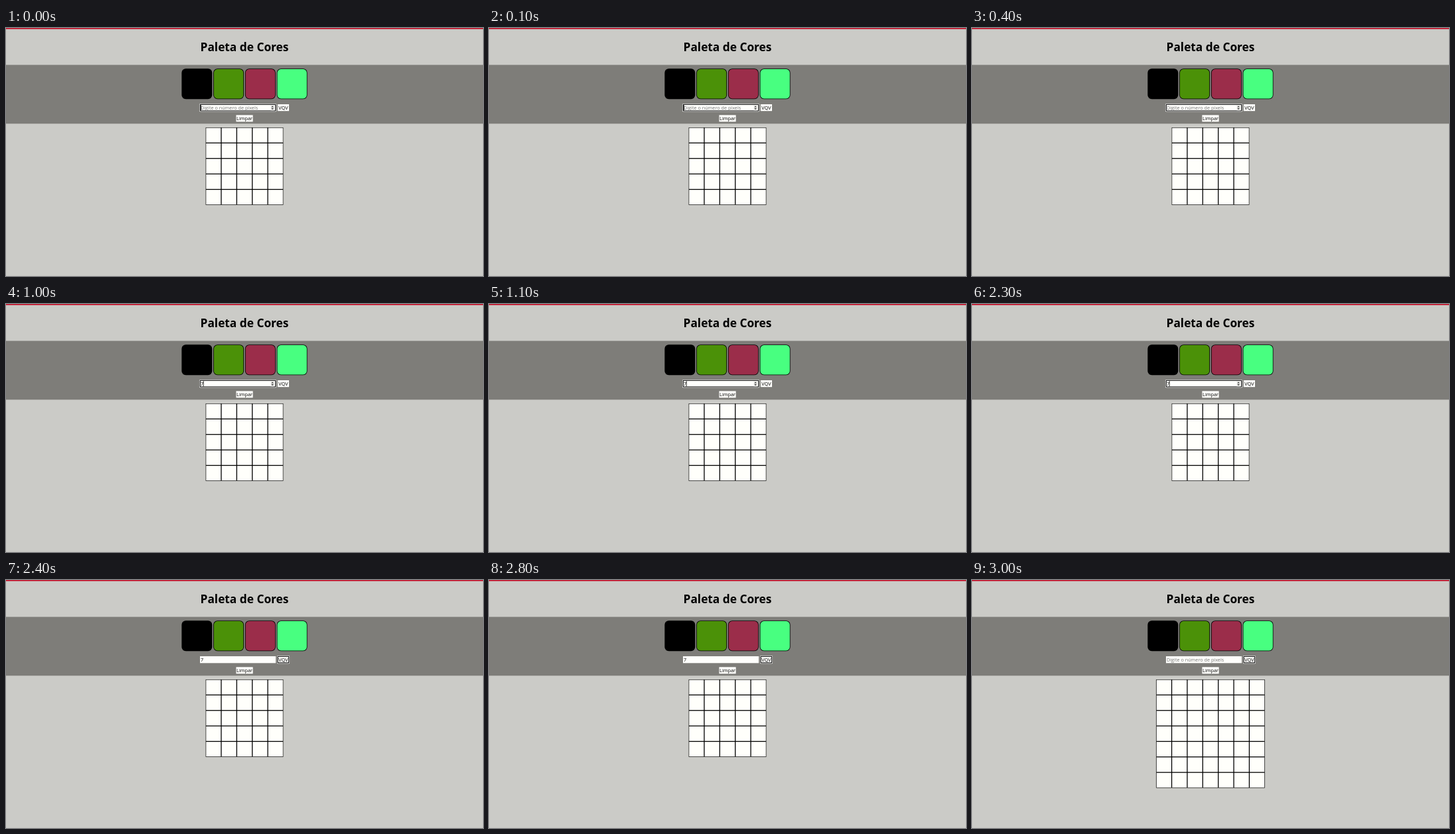
An HTML page with a canvas that plays this animation: 718x374 px, repeating every 5.2 s.

```html
<!DOCTYPE html>
<html lang="pt">
<head>
<meta charset="utf-8">
<title>Paleta de Cores</title>
<style>
html, body { margin: 0; width: 100%; height: 100%; overflow: hidden; background: #cbcbc7; }
canvas { display: block; width: 718px; height: 374px; }
</style>
</head>
<body>
<canvas id="stage" width="718" height="374"></canvas>
<script>
const ctx = document.getElementById('stage').getContext('2d');
const LOOP = 5200;
const TYPED = 1000, BLUR = 2400, SUBMIT = 3000;
const FONT = '"Open Sans", "Noto Sans", sans-serif';
const SMALL = '7.25px ' + FONT;
const SWATCHES = ['#000', '#4b9108', '#9b2d4a', '#48ff80'];

function box(x, y, w, h, color) {
  ctx.fillStyle = color;
  ctx.fillRect(x, y, w, h);
}

function label(str, x, y, color = '#000', align = 'left', font = SMALL) {
  ctx.font = font;
  ctx.textAlign = align;
  ctx.fillStyle = color;
  ctx.fillText(str, x, y);
}

function round(x, y, w, h, r, color) {
  ctx.beginPath();
  ctx.roundRect(x, y, w, h, r);
  ctx.fillStyle = color;
  ctx.fill();
}

// White halo, black ring, then the control itself
function focusRing(x, y, w, h) {
  round(x - 1, y - 1, w + 2, h + 2, 1.5, '#f4f4f2');
  round(x - 0.3, y - 0.3, w + 0.6, h + 0.6, 1, '#101010');
  box(x + 0.9, y + 0.9, w - 1.8, h - 1.8, '#fffffc');
}

function control(x, y, w, h, focused) {
  if (focused) focusRing(x, y, w, h);
  else box(x, y, w, h, '#fffffc');
}

function arrow(x, y, dir) {
  ctx.beginPath();
  ctx.moveTo(x - 1.9, y);
  ctx.lineTo(x + 1.9, y);
  ctx.lineTo(x, y + 2.1 * dir);
  ctx.fillStyle = '#333';
  ctx.fill();
}

function swatch(color, i) {
  const x = 264.4 + i * 47.75;
  round(x, 61.3, 45.9, 45.9, 6.2, '#000');
  round(x + 0.8, 62.1, 44.3, 44.3, 5.4, color);
}

function grid(n) {
  const size = 23.36, edge = 0.65;
  const left = 359 - n * size / 2, top = 150;
  box(left, top, n * size, n * size, '#000');
  for (let r = 0; r < n; r++)
    for (let c = 0; c < n; c++)
      box(left + c * size + edge, top + r * size + edge, size - 2 * edge, size - 2 * edge, '#fffffb');
}

function caretOn(t) {
  if (t < TYPED) return t < 400;
  return t < 1700 || t >= 2300;
}

function numberInput(t) {
  const focused = t < BLUR;
  const filled = t >= TYPED && t < SUBMIT;
  control(292, 115, 114, 10.3, focused);
  if (filled) label('7', 293.1, 122.7);
  else label('Digite o número de pixels', 293, 122.7, '#757575');
  if (!focused) return;
  box(398.4, 116, 5.4, 8.3, '#efefec');
  arrow(401.1, 119.5, -1);
  arrow(401.1, 120.9, 1);
  if (caretOn(t)) box(filled ? 296.8 : 293, 116.2, 0.8, 8, '#000');
}

function draw(t) {
  box(0, 0, 718, 374, '#cbcbc7');
  box(0, 0, 718, 1.6, '#c30a24');
  label('Paleta de Cores', 359, 35, '#000', 'center', 'bold 17.3px ' + FONT);
  box(0, 55.6, 718, 88.7, '#7e7d79');
  SWATCHES.forEach(swatch);
  numberInput(t);
  control(408.8, 115, 17.2, 10.2, t >= BLUR);
  label('VQV', 417.4, 122.7, '#000', 'center');
  control(346.4, 131.3, 25.2, 10, false);
  label('Limpar', 359, 138.8, '#000', 'center');
  grid(t < SUBMIT ? 5 : 7);
}

const start = performance.now();
function tick(now) {
  draw(Math.max(0, now - start) % LOOP);
  requestAnimationFrame(tick);
}
draw(0);
requestAnimationFrame(tick);
</script>
</body>
</html>
```
